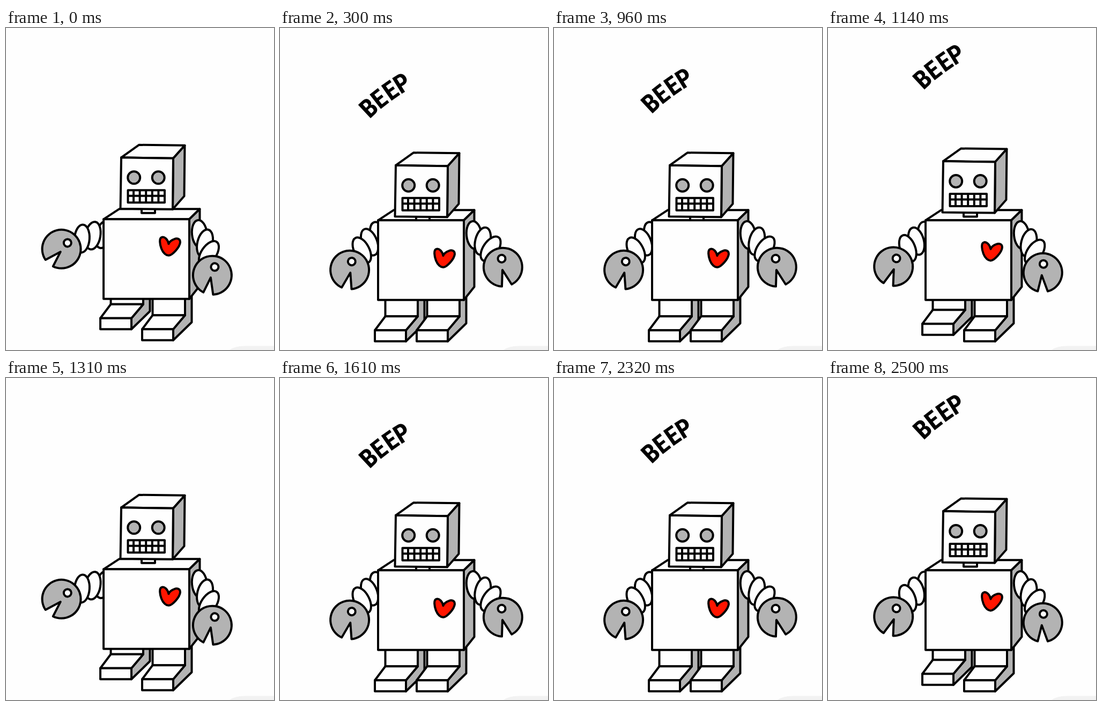
An HTML page that plays this animation: 500x600 px, repeating every 2610 ms.

```html
<!DOCTYPE html>
<html lang="en">
<head>
<meta charset="utf-8">
<title>Beeping robot</title>
<style>
  html, body { margin: 0; width: 100%; height: 100%; overflow: hidden; background: #fefefe; }
  svg { display: block; width: 500px; height: 600px; }
  .ink { fill: #fefefe; stroke: #000; stroke-width: 4; stroke-linejoin: round; }
  .gray { fill: #b3b3b3; }
  .line { fill: none; }
  #beep { font: 700 condensed 48px "Roboto Condensed", "Open Sans", "Noto Sans", sans-serif; }
</style>
</head>
<body>
<svg viewBox="0 0 500 600">
  <defs>
    <g id="leg">
      <path class="gray" d="M256 470H268.5V548L234 581.5V561L256 535Z"/>
      <path d="M195.5 470V535H256V470Z"/>
      <path d="M195.5 535H256L234 561H176Z"/>
      <path d="M176 561H234V581.5H176Z"/>
    </g>
  </defs>

  <path d="M417 600Q427 592.5 445 592.5H500V600Z" fill="#f2f2f2"/>

  <g id="robot" class="ink">
    <g id="legL"><use href="#leg"/></g>
    <g id="legR"><use href="#leg" x="78"/></g>
    <g id="armL"></g>

    <path d="M182 356L211 337H361.5L342 356Z"/>
    <path class="gray" d="M342 356L361.5 337V480L342 504.5Z"/>

    <g id="head">
      <path d="M253 330H278V344.5H253Z"/>
      <path d="M215 241L248 217.5L333.5 218.5L312 242.5Z"/>
      <path class="gray" d="M312 242.5L333.5 218.5L332.5 313L311 337.5Z"/>
      <path d="M215 241L312 242.5L311 337.5L213.5 336.5Z"/>
      <circle class="gray" cx="238.7" cy="278.5" r="11.5"/>
      <circle class="gray" cx="284.2" cy="278.5" r="11.5"/>
      <path d="M227.5 302H296V325H227.5Z"/>
      <path class="line" d="M227 312.5H296M238 302v23m11.6 -23v23m11.6 -23v23m11.6 -23v23m11.6 -23v23"/>
    </g>

    <path d="M182 356H342V504.5H182Z"/>
    <path id="heart" fill="#ff1500" d="M303.5 402C302 394 296 388 291 389.5C285 391 287 403 290 411C293 419 299 424 304 423.5C310 423 324 409 325 399C325 392 319 391 314 393C308 395 305 398 303.5 402Z"/>
    <g id="armR"></g>
  </g>

  <text id="beep" x="167 186 206 225" y="170.5 153 137.5 124.5" rotate="-43 -38 -35 -32">BEEP</text>
</svg>

<script>
const $ = id => document.getElementById(id);
const lerp = (a, b, k) => a + (b - a) * k;
const polar = ([x, y], r, deg) =>
  [x + r * Math.cos(deg * Math.PI / 180), y + r * Math.sin(deg * Math.PI / 180)];
const bezier = (a, b, c, t) =>
  a.map((v, i) => lerp(lerp(v, b[i], t), lerp(b[i], c[i], t), t));

// Two strides of eight steps; a step holds for three ticks, a few for two.
const LOOP = 2610, STEPS = 16, TICKS = 44;
const SHORT = [0, 5, 9, 15];

// side: -1 left, 1 right; raised and lowered are swing angles about the shoulder.
const LEFT = {
  side: -1, shoulder: [182, 384.5], reach: 83, raised: 161, lowered: 129.6,
  tilt: (swing, i) => swing - 145 - 6 * i
};
const RIGHT = {
  side: 1, shoulder: [361, 383.5], reach: 80.5, raised: 72.7, lowered: 48,
  tilt: (swing, i) => 20 * i - 6
};

const place = ([x, y], deg) => `transform="translate(${x} ${y}) rotate(${deg})"`;
const move = (id, x, y) => $(id).setAttribute("transform", `translate(${x} ${y})`);

function armMarkup({ side, shoulder, reach, raised, lowered, tilt }, drop) {
  const swing = lerp(raised, lowered, drop);
  const elbow = polar(shoulder, 38, swing - 18 * side);
  const hand = polar(shoulder, reach, swing);
  let out = "";
  for (let i = 0; i < 3; i++) {
    const at = bezier(shoulder, elbow, hand, 0.26 * i);
    out += `<ellipse rx="14" ry="26" ${place(at, tilt(swing, i))}/>`;
  }
  return out + `<g ${place(hand, swing + 30 * side)}>
    <path class="gray" d="M5 ${2 * side}L34.8 9.3A36 36 0 1 1 34.8 -9.3Z"/>
    <circle cx="-16" cy="-1" r="7"/></g>`;
}

// A foot rises over two steps, then lands at once.
const lift = phase => phase < 2 ? -12 - 8.5 * phase : 0;

function show(step) {
  const stride = step % 8, beat = step % 4;
  const drop = (1 - Math.cos(beat * Math.PI / 2)) / 2;
  const sink = drop ** 1.4;
  const crouch = stride < 2 ? 0 : 2;

  move("robot", Math.floor(drop), crouch + 0.3);
  move("head", 0, Math.max(12.5 * sink, 2.25 * crouch));
  move("heart", 0, 20 * sink);
  move("legL", 0, lift((stride + 1) % 8));
  move("legR", 0, lift((stride + 5) % 8));
  $("armL").innerHTML = armMarkup(LEFT, Math.cbrt(drop));
  $("armR").innerHTML = armMarkup(RIGHT, drop);

  // The word climbs, speeding up on one beat and slowing down on the next.
  const second = stride > 3 ? 1 : 0, rise = beat - 1;
  const bend = (second ? 5 : -5) * rise * (rise - 1);
  move("beep", 4 + 15 * second - 4 * rise, 54 - 9 * second - 54.5 * rise + bend);
  $("beep").style.visibility = beat ? "visible" : "hidden";
}

function stepAt(time) {
  let left = time / LOOP * TICKS;
  for (let step = 0; step < STEPS; step++) {
    left -= SHORT.includes(step) ? 2 : 3;
    if (left < 0) return step;
  }
  return 0;
}

let current = -1;
function tick() {
  const step = stepAt(performance.now() % LOOP);
  if (step !== current) show(current = step);
  requestAnimationFrame(tick);
}
tick();
</script>
</body>
</html>
```
